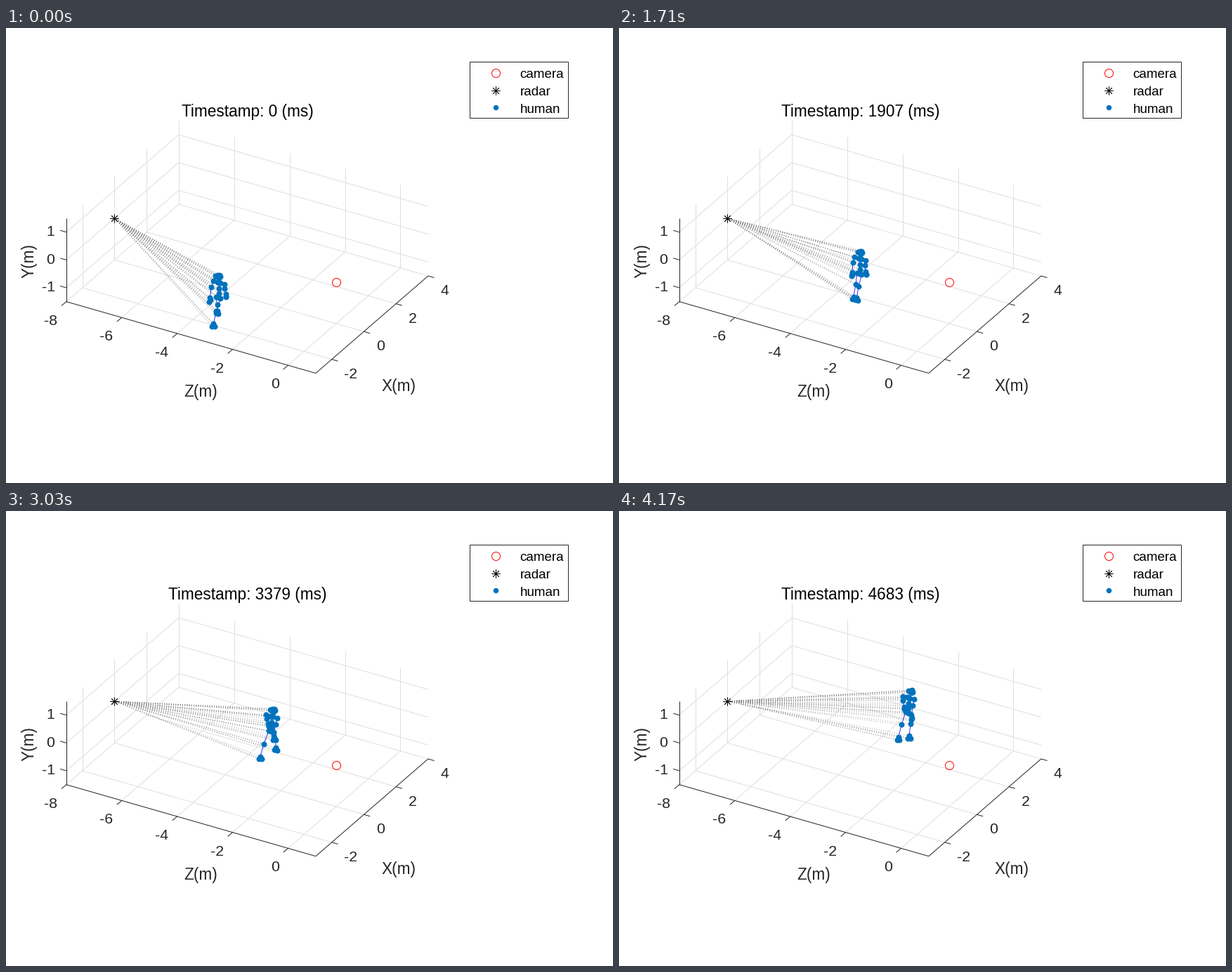
A matplotlib script that plays this animation: 864 px wide and 648 px high, repeating every 4200 ms.

```python
import numpy as np
import matplotlib.pyplot as plt
from matplotlib.animation import FuncAnimation
from matplotlib.collections import LineCollection

W, H = 864, 648
FRAMES, STEP_MS = 140, 30
INK, GRID, BLUE = "#262626", "#dfdfdf", "#0072bd"

plt.rcParams["font.family"] = "Liberation Sans"
fig = plt.figure(figsize=(W / 72, H / 72), dpi=72, facecolor="white")
ax = fig.add_axes([0, 0, 1, 1])
ax.set(xlim=(0.5, W + 0.5), ylim=(H + 0.5, 0.5))
ax.axis("off")

# Orthographic projection: screen step per metre along each axis
ORIGIN = np.array([86.3, 390.2])
EX, EY, EZ = np.array([[22.86, -19.8], [0, -39.6], [39.45, 11.33]])
X0, X1, Y0, Y1, Z0, Z1 = -3, 4, -1.5, 1.5, -8, 1


def project(x, y, z):
    return ORIGIN + (x - X0) * EX + (y - Y0) * EY + (z - Z0) * EZ


def text(x, y, s, size=21.3, ha="center", color=INK, **kw):
    return ax.text(x, y, s, fontsize=size, ha=ha, va="baseline",
                   color=color, zorder=8, **kw)


def segments(segs, color, z):
    ax.add_collection(LineCollection(segs, colors=color, linewidths=1, zorder=z))


def tick(p, direction):
    return [p, p + 9 * direction / np.hypot(*direction)]


def draw_axes():
    grid, ticks = [], []
    for x in (-2, 0, 2, 4):
        grid.append([project(x, Y0, Z0), project(x, Y0, Z1)])
        grid.append([project(x, Y0, Z0), project(x, Y1, Z0)])
        p = project(x, Y0, Z1)
        ticks.append(tick(p, EZ))
        text(p[0] + (27 if x < 0 else 24), p[1] + 27, str(x))
    for z in (-8, -6, -4, -2, 0):
        grid.append([project(X0, Y0, z), project(X1, Y0, z)])
        grid.append([project(X1, Y0, z), project(X1, Y1, z)])
        p = project(X0, Y0, z)
        ticks.append(tick(p, -EX))
        text(p[0] - (18.5 if z == 0 else 22), p[1] + 33, str(z))
    for y in (-1, 0, 1):
        grid.append([project(X0, y, Z0), project(X1, y, Z0)])
        grid.append([project(X1, y, Z0), project(X1, y, Z1)])
        p = project(X0, y, Z0)
        ticks.append(tick(p, -EZ))
        text(70, p[1] + 5.3, str(y), ha="right")
    segments(grid, GRID, 1)
    edges = [[project(X0, Y1, Z0), project(X0, Y0, Z0)],
             [project(X0, Y0, Z0), project(X0, Y0, Z1)],
             [project(X0, Y0, Z1), project(X1, Y0, Z1)]]
    segments(edges + ticks, INK, 2)
    text(277.3, 525.7, "Z(m)", 22.6)
    text(559.5, 517.7, "X(m)", 22.6)
    text(40, 331.5, "Y(m)", 22.6, rotation=90, rotation_mode="anchor")


def camera(x, y):
    ax.plot(x, y, "o", ms=12, mfc="none", mec="red", mew=1, zorder=7)


def radar(x, y):
    ax.plot(x, y, marker=(8, 2, 0), ms=12, mec="black", mew=0.8, zorder=7)


def draw_legend():
    ax.add_patch(plt.Rectangle((660, 48), 140, 80, fc="white", ec=INK, lw=1, zorder=6))
    for row, (mark, name) in enumerate(((camera, "camera"), (radar, "radar"),
                                        (None, "human"))):
        y = 64.3 + 24.7 * row
        if mark:
            mark(697, y)
        else:
            ax.plot(697, y, "o", ms=7.5, color=BLUE, mew=0, zorder=7)
        text(732, y + 7.4, name, 18.7, ha="left", color="black")


# Walk: time step, chest on screen (x, y), gait phase in cycles
WALK = np.array([[0, 303, 363, 0.4], [26, 311, 355.5, 1], [57, 343, 329, 1.68],
                 [74, 358, 315, 2.18], [101, 378.5, 293, 3],
                 [124, 393.5, 271.5, 3.93], [140, 412.5, 266.5, 4.13]])
TIMES, TRACK = WALK[:, 0], WALK[:, 1:]
SLOPE = np.gradient(TRACK, TIMES, axis=0)
FACE = np.array([[0, -0.5], [-3, 0], [2.5, -1], [3.5, 1.5], [-1, 1], [1.5, 3]])


def vec(x, y):
    return np.array([x, y])


def walk(t):
    """Chest position and gait phase on a smooth curve through WALK."""
    i = min(np.searchsorted(TIMES, t, side="right") - 1, len(TIMES) - 2)
    h = TIMES[i + 1] - TIMES[i]
    u = (t - TIMES[i]) / h
    x, y, phase = ((1 + 2 * u) * (1 - u) ** 2 * TRACK[i]
                   + u * (1 - u) ** 2 * h * SLOPE[i]
                   + u * u * (3 - 2 * u) * TRACK[i + 1]
                   + u * u * (u - 1) * h * SLOPE[i + 1])
    return vec(x, y), phase


def arm(chest, side, swing, spread):
    """Hanging arm that swings forward; spread opens it sideways."""
    shoulder = chest + side * vec(8, 2.4)
    elbow = shoulder + vec(-0.8, 7.5) + swing * vec(1.5, -1.5) + spread * side * vec(5, -3)
    wrist = shoulder + vec(-1, 19) + swing * vec(4, -6) + spread * side * vec(13, -9)
    hand = wrist + 0.4 * (wrist - elbow)
    return shoulder, elbow, wrist, hand, wrist + vec(0.7, 3.5)


def leg(chest, side, phase):
    """Leg stepping forward and lifting the foot once per cycle."""
    swing = np.cos(2 * np.pi * phase)
    lift = max(0, np.cos(2 * np.pi * (phase + 0.1)))
    hip = chest + vec(-0.5, 21.5) + side * vec(3.4, 1.2)
    knee = chest + vec(-3.5, 38) + side * vec(3.5, 1) + swing * vec(4, -2) + lift * vec(2, -4)
    ankle = chest + vec(-7, 56) + side * vec(4, 1) + swing * vec(5, -2) + lift * vec(5, -13)
    return hip, knee, ankle, ankle + vec(1.8, 3.8), ankle + vec(-2, 3.5)


def skeleton(t):
    """Joint positions and bone chains at time step t."""
    chest, phase = walk(t)
    spread = np.exp(-((t - 124) / 7) ** 2)  # arms open briefly near the end
    mid, low, pelvis = (chest + vec(0, d) for d in (8, 15, 21.5))
    head = chest + vec(-1.5 + t / 35, -10)
    joints = [chest, mid, low, pelvis, *(head + FACE)]
    bones = [[head, chest, mid, low, pelvis]]
    swing = np.cos(2 * np.pi * phase)
    for side in (-1, 1):
        shoulder, elbow, wrist, hand, thumb = upper = arm(chest, side, -side * swing, spread)
        hip, knee, ankle, toe, heel = lower = leg(chest, side, phase + (side < 0) / 2)
        collar = chest + side * vec(2, 0.6)
        joints += [collar, *upper, *lower]
        bones += [[chest, collar, shoulder, elbow, wrist, hand], [wrist, thumb],
                  [pelvis, hip, knee, ankle, toe], [ankle, heel]]
    return np.array(joints), bones


draw_axes()
draw_legend()
radar_pos = project(0, 0, Z0)
radar(*radar_pos)
camera(*(project(0, 0, 0) + vec(0.5, 0.5)))
title = text(344.5, 126.4, "", 22.6, color="black")

rays = LineCollection([], colors="0.5", linewidths=0.75,
                      linestyles=[(0, (1.3, 3))], zorder=3)
links = LineCollection([], colors="blue", linewidths=0.8, zorder=4)
ax.add_collection(rays)
ax.add_collection(links)
dots, = ax.plot([], [], "o", ms=8, color=BLUE, mew=0, zorder=5)


def update(k):
    t = k + (k > 131)  # one sample is dropped late in the recording
    joints, bones = skeleton(t)
    title.set_text(f"Timestamp: {round(33.452 * t)} (ms)")
    rays.set_segments([[radar_pos, j] for j in joints])
    links.set_segments([np.array(b) for b in bones])
    dots.set_data(joints[:, 0], joints[:, 1])
    return title, rays, links, dots


anim = FuncAnimation(fig, update, frames=FRAMES, interval=STEP_MS,
                     repeat=True, repeat_delay=0, blit=False)
plt.show()
```
